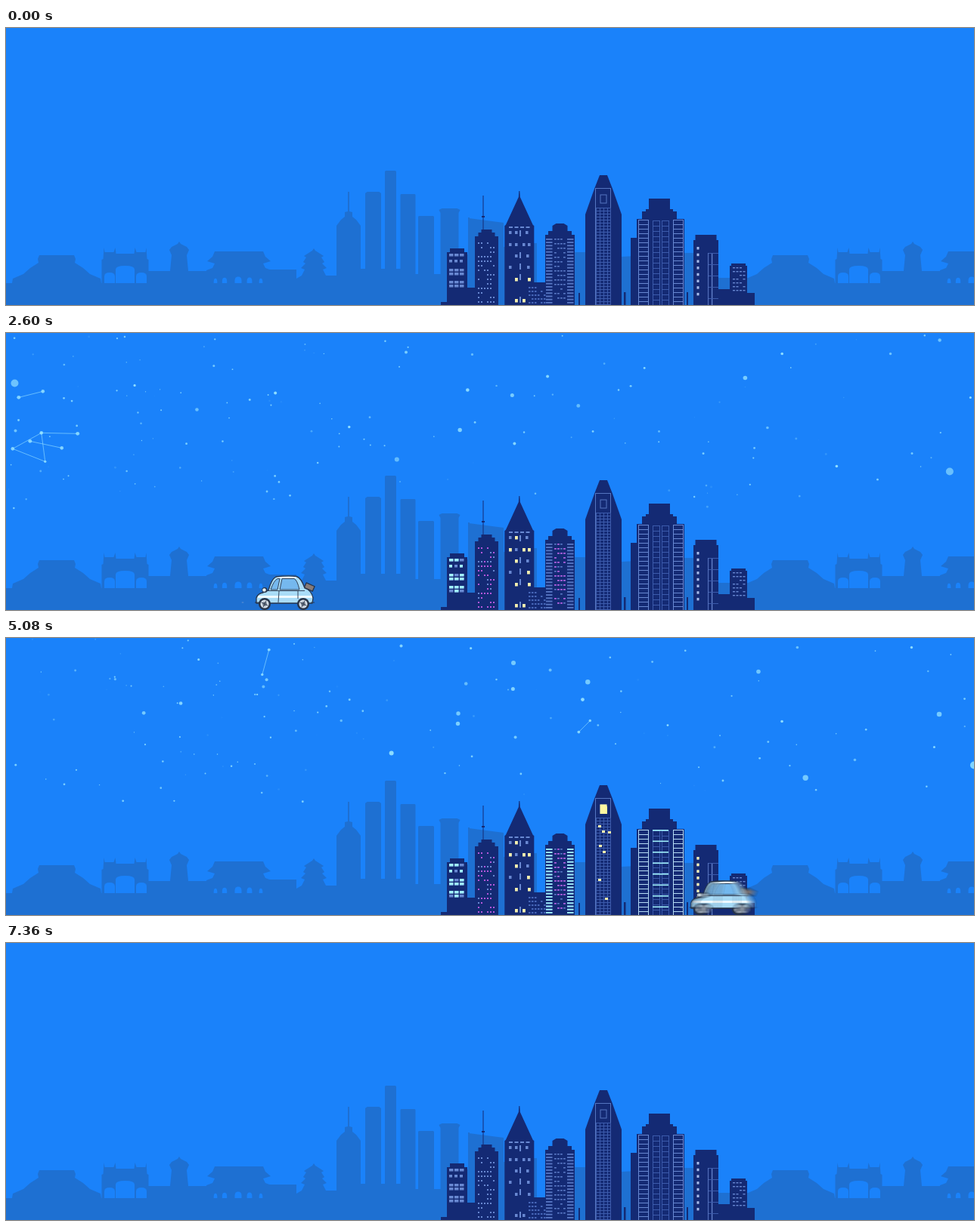
These frames come from a looping animation (1280 px wide and 367 px high, 7720 ms). An HTML page with a canvas:

```html
<!DOCTYPE html>
<html lang="en">
<head>
<meta charset="utf-8">
<title>City at dusk</title>
<style>
html, body { margin: 0; width: 100%; height: 100%; overflow: hidden; background: #1a82fa; }
canvas { display: block; width: 1280px; height: 367px; }
</style>
</head>
<body>
<canvas id="stage" width="1280" height="367"></canvas>
<script>
const W = 1280, H = 367, LOOP = 7720;
const SKY = '#1a82fa', FAR = '#1e70d2', NAVY = '#142a74';
const DIM = '#6888d2', LINE = '#3c5bac', CYAN = '#9ff0fc', YELLOW = '#f4efae', PINK = '#b457dc', AZURE = '#35a4f4';
const stage = document.getElementById('stage').getContext('2d');
const cityCanvas = document.createElement('canvas');
cityCanvas.width = W;
cityCanvas.height = H;
const city = cityCanvas.getContext('2d');

const clamp = v => Math.max(0, Math.min(1, v));
const hash = (a, b = 0) => {
  const v = Math.sin(a * 12.9898 + b * 78.233) * 43758.5453;
  return v - Math.floor(v);
};
const pairs = s => s.split(' ').map(p => p.split(',').map(Number));
function box(c, color, x, y, w, h = H - y) {
  c.fillStyle = color;
  c.fillRect(x, y, w, h);
}
// outline given as half width and height, top to bottom, standing on the ground
function mirror(c, color, cx, half) {
  const pts = pairs(half);
  pts.push([pts[pts.length - 1][0], H]);
  c.fillStyle = color;
  c.beginPath();
  pts.forEach(([w, y]) => c.lineTo(cx + w, y));
  pts.reverse().forEach(([w, y]) => c.lineTo(cx - w, y));
  c.fill();
}
function grid(x0, cols, dx, y0, rows, dy, fn) {
  for (let j = 0; j < rows; j++)
    for (let i = 0; i < cols; i++) fn(x0 + i * dx, y0 + j * dy, hash(i + x0, j));
}

// ---------- far skyline ----------
function arch(c, x, y, w) {
  c.fillStyle = SKY;
  c.beginPath();
  c.moveTo(x, 338);
  c.lineTo(x, y + 5);
  c.quadraticCurveTo(x, y, x + w / 2, y);
  c.quadraticCurveTo(x + w, y, x + w, y + 5);
  c.lineTo(x + w, 338);
  c.fill();
}
function oldTown(c) {
  box(c, FAR, 0, 338, 391);
  box(c, FAR, 187, 322, 80);
  box(c, FAR, 340, 320, 44);
  mirror(c, FAR, 67, '23,301 25,306 24,311 35,318 44,326 58,332 59,338');
  mirror(c, FAR, 157.5, '12,299 13,291 15,297 27,297 28,291 29,306 31,307');
  mirror(c, FAR, 229, '0,283 2,286 10,290 13,294 10,301 12,322');
  mirror(c, FAR, 308, '32,296 35,303 42,309 32,312 35,318 43,321');
  arch(c, 145, 315, 25);
  arch(c, 130, 324, 14);
  arch(c, 172, 324, 14);
  for (const x of [277, 289, 307, 322, 337]) {
    const r = 4.5 - Math.abs(x - 307) / 14;
    arch(c, x - r, 334 - r, r * 2);
  }
}
function farTown(c) {
  for (const x of [0, 970]) {
    c.save();
    c.translate(x, 0);
    oldTown(c);
    c.restore();
  }
  mirror(c, FAR, 407, '0,292 2,295 13,302 10,304 14,310 11,312 17,318 12,320 16,328 23,332');
  mirror(c, FAR, 453, '1,217 1,243 5,244 5,250 10,254 16,262');
  box(c, FAR, 420, 328, 60);
  box(c, FAR, 469, 319, 53);
  box(c, FAR, 520, 326, 60);
  mirror(c, FAR, 485.5, '8,217 10.5,219');
  mirror(c, FAR, 508.5, '6,189 7.5,190');
  mirror(c, FAR, 531.5, '9,220 10,221');
  mirror(c, FAR, 555.5, '9.5,249 10.5,250');
  mirror(c, FAR, 586.5, '10,239 14,241 12,245');
  mirror(c, FAR, 612, '1,251 1,252');
  box(c, FAR, 598, 300, 15);
  c.beginPath();
  for (const p of pairs('612,252 658,258 658,290 697,290 697,285 702,285 702,337 750,337 750,297 770,297 815,303 897,298 910,298 920,331 985,331 985,367 612,367')) c.lineTo(...p);
  c.fill();
}

// ---------- near skyline ----------
const spireWindows = pairs('665,269 673,269 687,269 665,285 673,285 683,285 690,285 673,300 688,300 665,315 689,315 673,331 690,331 673,359 683,359');
const never = [0, 2, 4, 8, 9];
function nearTown(c) {
  const b = (...r) => box(c, NAVY, ...r);
  const m = (cx, half) => mirror(c, NAVY, cx, half);
  b(575, 363, 20);
  b(608, 344, 14);
  b(630.5, 222, 1);
  b(629, 249, 4, 2);
  b(687, 337, 28);
  b(757, 351, 2);
  b(817, 350, 2.5);
  b(900, 350, 2);
  b(826, 278, 9);
  b(834, 253, 63);
  b(942, 346, 37);
  b(978, 351, 12);
  m(596.5, '9.5,292 9.5,297 13.5,297');
  m(635.5, '7,267 7,271 11,271 11,276 15.5,276');
  m(678.8, '.5,216 1,224 18,261 19.5,262');
  m(732.5, '5,259 10,262 10,269 15.5,269 15.5,274 19.5,274');
  m(790, '5,195 12,213 24,247');
  m(864, '14,226 14,240 18,240 18,243 23,243 23,253');
  m(925.5, '14,274 14,281 16.5,281');
  m(968.5, '9.5,312 9.5,315 11.5,315');

  blockWindows(c, DIM, 1);
  dotWindows(c, DIM, .55);
  grid(665, 4, 7.5, 263, 1, 1, (x, y) => box(c, DIM, x, y, 5, 2));
  for (const y of [268, 297, 312, 326, 356]) box(c, DIM, 679, y, 2, 8);
  for (const [x, y] of spireWindows) box(c, DIM, x, y, 3.5, 4);
  grid(691, 6, 4, 343, 5, 5, (x, y, r) => r < .75 && box(c, '#4666b8', x, y, 2.5, 2));
  sideBars(c, '#5877c4', 0);
  coreDots(c, '#5877c4', .75);

  c.strokeStyle = '#5575c0';
  c.strokeRect(779.5, 212.5, 20, 156);
  c.strokeRect(786, 221, 8, 11);
  ladder(c, LINE, 780, 19, 238, 4);
  ladder(c, LINE, 785, 5, 238, H);
  ladder(c, LINE, 790, 5, 238, H);
  for (const x of [836, 882]) ladder(c, DIM, x, 13, 254, 6);
  for (const x of [855, 867]) ladder(c, LINE, x, 9, 255, 7);
  sideDots(c, '#a7bdec');
  box(c, DIM, 928, 298, .8);
  box(c, DIM, 933, 298, 1.2);
  grid(929, 1, 1, 298, 5, 15, (x, y) => box(c, LINE, x, y, 13, 1));
  dashes(c, DIM);
}

// ---------- windows ----------
function ladder(c, color, x, w, top, step) {
  for (let y = top; y < H; y += step) box(c, color, x, y, w, 1);
  box(c, color, x, top, 1);
  box(c, color, x + w, top, 1);
}
function blockWindows(c, color, share) {
  for (const y of [299, 307, 319, 324, 335, 340])
    for (const x of [586, 593, 600])
      if (hash(x, y) < share) box(c, color, x, y, y === 307 ? 4 : 5.5, 3.5);
}
function dotWindows(c, color, share) {
  grid(624, 6, 4, 284, 14, 6, (x, y, r) => r < share && box(c, color, x, y, 2, 2));
}
function sideBars(c, color, top) {
  grid(714, 2, 28, 279, 21, 4.2, (x, y) => y >= top && box(c, color, x, y, 8.5, 1.8));
}
function coreDots(c, color, share) {
  grid(725, 4, 4, 279, 14, 6, (x, y, r) => r < share && box(c, color, x, y, 2.8, 1.6));
}
function sideDots(c, color) {
  grid(913.5, 1, 1, 290, 8, 8.7, (x, y) => box(c, color, x, y, 3, 3.5));
}
function dashes(c, color) {
  grid(961, 4, 4.5, 317, 7, 5, (x, y, r) => r < .8 && box(c, color, x, y, 3, 1.4));
}
function lights(c, t) {
  const on = (from, to) => t >= from && t < to;
  if (on(600, 6400)) blockWindows(c, CYAN, .72 * clamp((t - 500) / 1000));
  if (on(1200, 6500)) dotWindows(c, t < 2200 || t > 5400 ? AZURE : PINK, .42);
  if (t < 6600) spireWindows.forEach(([x, y], i) => {
    const from = i > 10 ? 0 : 400 + hash(i) * 1000;
    if (t >= from && !never.includes(i)) box(c, YELLOW, x, y, 3.8, 4.5);
  });
  if (on(2300, 6700)) coreDots(c, t < 5400 ? PINK : CYAN, .5);
  if (on(3300, 6700)) sideBars(c, CYAN, 365 - (t - 3300) * .09);
  if (on(3600, 4200)) box(c, CYAN, 779, 211, 21, 2);
  if (on(4300, 6800)) {
    c.save();
    c.shadowColor = '#fff58a';
    c.shadowBlur = 5 * clamp((t - 5000) / 600);
    box(c, '#fdf6a0', 785.5, 220.5, 9, 12.5);
    c.restore();
    pairs('783,248 788,255 796,256 784,274 789,282 783,319 792,344')
      .forEach(([x, y], i) => t > 4350 + i * 70 && box(c, YELLOW, x, y, 4, 3));
  }
  if (on(4400, 6900)) {
    for (const x of [836, 882]) ladder(c, '#b5dcf6', x, 13, 254, 6);
    grid(855, 1, 1, 254, 8, 14.5, (x, y) => t > 4400 + (y - 254) * 4 && box(c, CYAN, x, y, 21, 1.6));
  }
  if (on(4700, 7000)) sideDots(c, YELLOW);
  if (on(5300, 7100)) dashes(c, PINK);
}

// ---------- stars: x, y, radius at 1840 ms ----------
const mainStars = [
  [22, 71, 5], [23, 134, 2], [178, 74, 1.6], [281, 48, 1.5], [259, 106, 2.3], [457, 129, 1.7], [531, 30, 2],
  [617, 33, 1.6], [611, 80, 2.3], [601, 133, 2.7], [519, 172, 3], [715, 62, 2], [672, 151, 2], [755, 101, 2.4],
  [774, 135, 1.4], [841, 51, 1.4], [860, 135, 1.4], [972, 64, 2.8], [1020, 32, 1.8], [1001, 130, 1.8],
  [984, 157, 1.4], [1091, 181, 1.8], [1161, 32, 1.7], [1225, 14, 2.2], [1265, 90, 1.5], [1189, 164, 1.5],
  [1238, 188, 5], [361, 84, 2], [669, 87, 2.5]
];
// x, y, radius and the moment the star appears there
const lateStars = [
  [1046, 193, 3.7, 3800], [1234, 101, 3.3, 5080], [766, 66, 3.2, 3800], [671, 33, 3, 5080],
  [417, 183, 3.3, 5760], [598, 100, 2.7, 5080], [195, 107, 2.4, 3800], [353, 63, 2, 3800]
];
const smallStars = Array.from({ length: 210 }, (_, i) => ({
  x: hash(i, 1) < .62 ? hash(i, 2) * 450 : 450 + hash(i, 2) * 830,
  y: hash(i, 3) * 232,
  r: .6 + hash(i, 4) * .9,
  phase: hash(i, 5) * 6.3
}));
// points, and the moment they hold
const figures = [
  ['0,165 21,157 57,139 61,175 21,157', 1840],
  ['380,52 374,79 421,80', 1840],
  ['113,207 127,195', 1840],
  ['94,133 46,132 51,170 8,153 46,132', 2650],
  ['31,143 73,152', 2650],
  ['16,85 48,77', 2650],
  ['704,1 737,7', 3800],
  ['346,14 337,47', 5300],
  ['758,123 773,108', 5300],
  ['0,104 47,121 7,148 0,104', 5800]
];
const drift = (x, y, dt) => [x + (x - 650) * 2.2e-5 * dt, y - .006 * dt];

function dot(c, [x, y], r, alpha) {
  if (alpha <= 0) return;
  c.globalAlpha = alpha;
  c.beginPath();
  c.arc(x, y, r, 0, 7);
  c.fill();
}
function stars(c, t) {
  const fade = clamp((t - 20) / 1100) * clamp((7340 - t) / 650);
  if (!fade) return;
  c.save();
  c.fillStyle = '#94e2ff';
  mainStars.forEach(([x, y, r], i) =>
    dot(c, drift(x, y, t - 1840), r, fade * (.78 + .18 * Math.sin(t / 700 + i * 2))));
  lateStars.forEach(([x, y, r, at]) =>
    dot(c, drift(x, y, t - at), r, fade * .75 * clamp((t - at + 400) / 300)));
  smallStars.forEach(s =>
    dot(c, drift(s.x, s.y, t - 2600), s.r, fade * .8 * clamp(.35 + Math.sin(t / 600 + s.phase))));
  c.strokeStyle = '#8fdcff';
  c.lineWidth = 1;
  for (const [list, at] of figures) {
    const alpha = fade * clamp((600 - Math.abs(t - at)) / 250);
    if (!alpha) continue;
    const pts = pairs(list).map(([x, y]) => drift(x, y, (t - at) * 1.2));
    c.globalAlpha = alpha * .65;
    c.beginPath();
    pts.forEach(p => c.lineTo(...p));
    c.stroke();
    pts.forEach((p, i) => dot(c, p, 1.5 + hash(i, at), alpha * .85));
  }
  c.restore();
}

// ---------- car: time, x, speed ----------
const route = [
  [1000, -60, .6], [1840, 301, .2], [2600, 368, .02], [3300, 377, .015],
  [3800, 412, .2], [5080, 948, .52], [5760, 1314, .55], [6000, 1446, .55]
];
function carX(t) {
  const i = route.findIndex((k, n) => n && t <= k[0]);
  if (i < 1) return 1446;
  const [t0, x0, v0] = route[i - 1], [t1, x1, v1] = route[i];
  const d = t1 - t0, u = (t - t0) / d, w = 1 - u;
  return x0 * (1 + 2 * u) * w * w + v0 * d * u * w * w + x1 * u * u * (3 - 2 * u) - v1 * d * u * u * w;
}
const bodyPath = new Path2D('M-37 358V351Q-35 345 -28 344L-21 341Q-17 326 -11 323Q5 321 16 322.5Q22 324 27 338Q36 341 38 351L37 358Z');
const glassPath = new Path2D('M-18 340Q-14 328 -9 325.5H-6L-9 340ZM-6 340L-3 325.5H13Q17 327 20 340Z');
const trimPath = new Path2D('M-22 341.5H27M-7 342L-8 357M18 342V352M-39 357H-30M35 357H40');
const INK = '#273449';
function car(c, x, spin) {
  const disc = (cx, cy, r, color) => {
    c.fillStyle = color;
    c.beginPath();
    c.arc(cx, cy, r, 0, 7);
    c.fill();
  };
  c.save();
  c.translate(x, 0);
  c.lineJoin = 'round';
  c.strokeStyle = INK;
  c.lineWidth = 1.3;
  c.save();
  c.translate(33, 337);
  c.rotate(.42);
  box(c, '#867b78', -6, -4, 12, 7);
  c.strokeRect(-6, -4, 12, 7);
  c.restore();
  c.fillStyle = '#a9dcf7';
  c.fill(bodyPath);
  c.fillStyle = '#75b8ee';
  c.fill(glassPath);
  box(c, '#eefaff', -35, 348, 72, 3);
  box(c, '#eefaff', -10, 323, 26, 1.8);
  c.stroke(bodyPath);
  c.lineWidth = .9;
  c.stroke(glassPath);
  c.stroke(trimPath);
  disc(-26, 340.5, 3.6, INK);
  disc(-26.5, 340.5, 2.3, '#e7f5fb');
  for (const wx of [-26, 25]) {
    disc(wx, 359, 8, INK);
    disc(wx, 359, 5.6, '#d6dee6');
    disc(wx, 359, 3, '#7d8794');
    c.beginPath();
    for (let k = 0; k < 4; k++) {
      const a = spin + k * Math.PI / 2;
      c.moveTo(wx, 359);
      c.lineTo(wx + 5 * Math.cos(a), 359 + 5 * Math.sin(a));
    }
    c.stroke();
  }
  c.restore();
}
const blur = document.createElement('canvas');
blur.width = 160;
blur.height = H;
const bc = blur.getContext('2d');
function drive(c, t) {
  if (t < 1000 || t > 6000) return;
  const x = carX(t), speed = (carX(t + 10) - carX(t - 10)) / 20;
  const puff = .5 + .5 * Math.cos((t - 440) / 240 * Math.PI);
  c.save();
  c.globalAlpha = .35 + .4 * puff;
  c.fillStyle = '#8fa9d6';
  c.beginPath();
  c.ellipse(x - 55, 357, 1.5 + 3.5 * puff, 1 + 1.7 * puff, 0, 0, 7);
  c.fill();
  // exposure averaged over a short shutter
  const shots = speed < .06 ? 1 : 7, base = Math.floor(x) - 80;
  bc.clearRect(0, 0, 160, H);
  car(bc, x - base, x / 8);
  for (let i = 0; i < shots; i++) {
    c.globalAlpha = 1 / (i + 1);
    c.drawImage(blur, base + (shots > 1 ? (i / 6 - .5) * speed * 22 : 0), 0);
  }
  c.restore();
}

farTown(city);
nearTown(city);

function draw(t) {
  box(stage, SKY, 0, 0, W, H);
  stars(stage, t);
  stage.drawImage(cityCanvas, 0, 0);
  lights(stage, t);
  drive(stage, t);
}
const start = performance.now();
function tick() {
  draw((performance.now() - start) % LOOP);
  requestAnimationFrame(tick);
}
tick();
</script>
</body>
</html>
```
